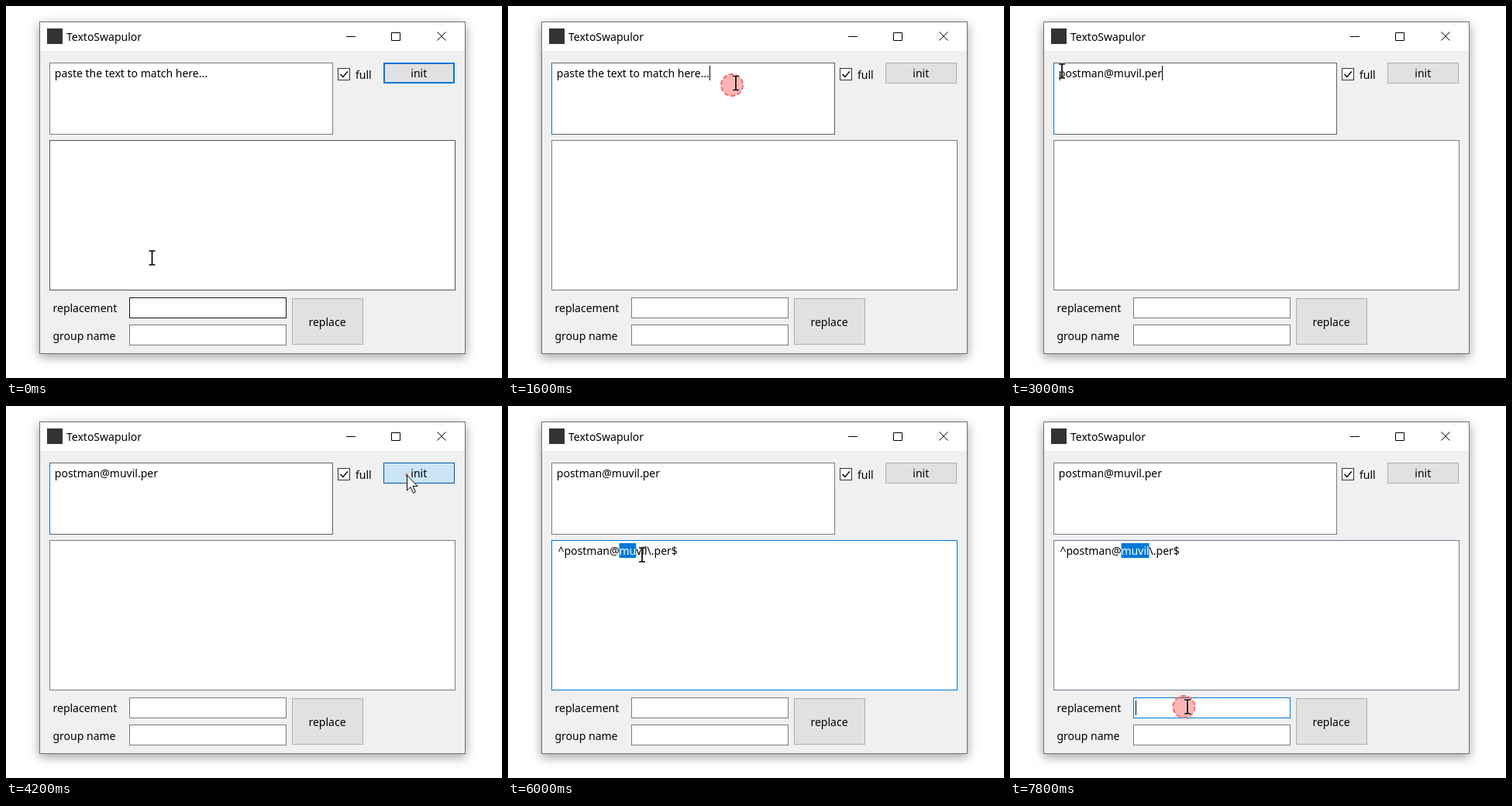
These frames come from a looping animation (640x480 px, 8000 ms). An HTML page:

```html
<!DOCTYPE html>
<html lang="en">
<head>
<meta charset="utf-8">
<title>Text replacement tool</title>
<style>
  html, body { margin: 0; width: 100%; height: 100%; overflow: hidden; background: #fff; }
  svg { display: block; width: 640px; height: 480px; }
  text { font: 14px "Noto Sans", "Open Sans", sans-serif; white-space: pre; }
  .frame { fill: #f0f0f0; stroke: #707070; filter: drop-shadow(0 4px 7px rgba(0, 0, 0, .38)); }
  .field { fill: #fff; stroke: #7a7a7a; }
  .button { fill: #e1e1e1; stroke: #adadad; }
  .line { fill: none; stroke: #000; }
  .mid { text-anchor: middle; }
  .sel { fill: #0078d7; }
  .inv { fill: #fff; }
</style>
</head>
<body>
<svg viewBox="0 0 640 480">
  <defs>
    <clipPath id="clipA"><rect id="cutA" y="77" height="19"/></clipPath>
    <clipPath id="clipB"><rect id="cutB" y="177" height="19"/></clipPath>
  </defs>
  <rect width="640" height="480" fill="#fff"/>
  <rect class="frame" x="43.5" y="20.5" width="549" height="428"/>
  <rect x="44" y="21" width="548" height="37" fill="#fff"/>
  <rect x="53" y="29" width="20" height="20" fill="#333"/>
  <text x="78" y="45">TextoSwapulor</text>
  <path class="line" d="M439 39.5h12M497.5 34.5h11v10h-11zM556.5 33.5l11 11m0-11l-11 11"/>

  <rect id="input" class="field" x="56.5" y="73.5" width="365" height="92"/>
  <path id="inputEdge" d="M56.5 73v93" stroke="#0078d7"/>
  <text id="textA" x="62.8" y="92"></text>
  <rect id="selA" class="sel" y="77" height="19"/>
  <text id="invA" class="inv" x="62.8" y="92" clip-path="url(#clipA)"></text>

  <rect x="428.5" y="80.5" width="15" height="15" fill="#fff" stroke="#333"/>
  <path class="line" d="M431.5 88l3.3 3.5 6-7" stroke-width="1.4"/>
  <text x="451" y="94">full</text>
  <rect id="init" class="button"/>
  <text class="mid" x="532.8" y="92">init</text>

  <rect id="pattern" class="field" x="56.5" y="173.5" width="523" height="193"/>
  <text id="textB" x="64.5" y="192"></text>
  <rect id="selB" class="sel" y="177" height="19"/>
  <text id="invB" class="inv" x="64.5" y="192" clip-path="url(#clipB)"></text>

  <text x="60.5" y="395">replacement</text>
  <text x="60.5" y="431">group name</text>
  <rect id="repl" class="field" x="159.5" y="376.5" width="202" height="26"/>
  <rect class="field" x="159.5" y="411.5" width="202" height="26"/>
  <rect class="button" x="369.5" y="377.5" width="91" height="59"/>
  <text class="mid" x="414.5" y="413">replace</text>

  <rect id="caret" width="1"/>
  <circle id="ring" fill="#f00" fill-opacity=".29" stroke="#f26b6b" stroke-width="2" stroke-dasharray="6 2.8"/>
  <g id="beam">
    <path d="M-4 -9h3l1 1 1-1h3M-4 9h3l1-1 1 1h3M0 -8v16" fill="none" stroke="#fff" stroke-width="3" opacity=".6"/>
    <path d="M-4 -9h3l1 1 1-1h3M-4 9h3l1-1 1 1h3M0 -8v16" fill="none" stroke="#000" stroke-width="1.7"/>
  </g>
  <path id="arrow" d="M.5 .5v19.5l4.5-4.4 3.4 7.6 3-1.4-3.4-7.4h6z" fill="#fff" stroke="#000"/>
</svg>
<script>
const LOOP = 8000, STEP = 200;
const PROMPT = 'paste the text to match here...';
const MAIL = 'postman@muvil.per';
const PATTERN = '^postman@muvil\\.per$';
const GREY = '#7a7a7a', DARK = '#171717', BLUE = '#0078d7';

// time, x, y of the pointer
const PATH = [
  [0, 188.5, 325], [1200, 293, 102], [1600, 294, 99.5], [2200, 72, 73.5],
  [2400, 67, 79.5], [2600, 67, 84], [3000, 67, 84], [3600, 398, 147],
  [3800, 490, 66], [4000, 516, 86], [4200, 517, 89], [4400, 517, 90],
  [4800, 225, 222], [5000, 194, 200], [5400, 148, 190], [5600, 145, 191],
  [6000, 173, 192], [6400, 184, 192], [6800, 184, 192], [7600, 228, 389], [7800, 229, 388]
];
// time, x, y of each press
const CLICKS = [[1400, 289, 102], [4200, 517, 89], [5600, 140, 191], [7600, 224.5, 388]];

const ui = {};
document.querySelectorAll('svg [id]').forEach(el => ui[el.id] = el);

const set = (el, attrs) => { for (const k in attrs) el.setAttribute(k, attrs[k]); };
const show = (el, on) => { el.style.display = on ? '' : 'none'; };
const paint = (el, color) => { el.style.stroke = color; };
const inside = (x, y, l, t, r, b) => x >= l && x <= r && y >= t && y <= b;

function pointer(t) {
  const i = PATH.findIndex(k => k[0] > t);
  if (i < 0) return PATH[PATH.length - 1].slice(1);
  const a = PATH[i - 1], b = PATH[i];
  const p = (t - a[0]) / (b[0] - a[0]), e = p * p * (3 - 2 * p);
  return [a[1] + (b[1] - a[1]) * e, a[2] + (b[2] - a[2]) * e];
}

function write(id, str) {
  for (const el of [ui['text' + id], ui['inv' + id]])
    if (el.textContent !== str) el.textContent = str;
}

function edge(el, n) {
  return +el.getAttribute('x') + (n ? el.getSubStringLength(0, n) : 0);
}

function select(id, from, to) {
  const el = ui['text' + id];
  const on = to > from;
  const x = on ? edge(el, from) : 0, width = on ? edge(el, to) - x : 0;
  set(ui['sel' + id], { x, width });
  set(ui['cut' + id], { x, width });
}

function charAt(el, x) {
  let n = 0;
  const len = el.textContent.length;
  while (n < len && (edge(el, n) + edge(el, n + 1)) / 2 < x) n++;
  return n;
}

function drawInit(t) {
  const focus = t < 1400 || (t >= 4600 && t < 5600);
  const pressed = t === 4200, hover = t === 4000 || t === 4400;
  const o = focus ? 1 : .5;
  set(ui.init, { x: 487 + o, y: 73 + o, width: 92 - 2 * o, height: 27 - 2 * o, 'stroke-width': 2 * o });
  ui.init.style.fill = pressed ? '#cce4f7' : hover ? '#e5f1fb' : '#e1e1e1';
  paint(ui.init, pressed ? '#005499' : focus || hover ? BLUE : '#adadad');
}

function drawBorders(t) {
  const editing = t >= 1400 && t < 4400;
  show(ui.inputEdge, editing);
  paint(ui.input, editing ? '#5e6267' : t >= 1000 && t < 1400 ? DARK : t >= 4400 && t < 5200 ? '#444' : GREY);
  paint(ui.pattern,
    t < 200 ? '#555' : t < 800 ? DARK : t < 4800 ? GREY :
    t < 5600 ? DARK : t < 7600 ? BLUE : '#6b7a90');
  paint(ui.repl, t < 200 || t === 7400 ? DARK : t >= 7600 ? BLUE : GREY);
}

function drawCaret(t) {
  const typed = t >= 2800;
  const blink = Math.floor((t - 2800) / 530) % 2 === 0;
  const inInput = (t >= 1400 && t < 1800) || (typed && t < 4200 && blink);
  const inRepl = t >= 7600;
  show(ui.caret, inInput || inRepl);
  if (inRepl) set(ui.caret, { x: 162, y: 380, height: 19 });
  else if (inInput) {
    const x = Math.round(edge(ui.textA, ui.textA.textContent.length));
    set(ui.caret, { x, y: 77, height: 19 });
  }
}

function drawPointer(t, x, y) {
  const text = inside(x, y, 56, 73, 422, 166) || inside(x, y, 56, 173, 580, 367) ||
    inside(x, y, 159, 376, 362, 403);
  show(ui.beam, text);
  show(ui.arrow, !text);
  set(text ? ui.beam : ui.arrow, { transform: `translate(${x.toFixed(1)} ${y.toFixed(1)})` });

  const click = CLICKS.find(c => t >= c[0] && t < c[0] + 400);
  show(ui.ring, click);
  if (click) set(ui.ring, { cx: click[1], cy: click[2], r: t === click[0] ? 1 : 14 });
}

function render(time) {
  const t = Math.floor(time / STEP) * STEP;
  const [x, y] = pointer(t);
  write('A', t < 2800 ? PROMPT : MAIL);
  write('B', t < 4400 ? '' : PATTERN);

  const dragging = t >= 1800 && t < 2800;
  select('A', dragging ? charAt(ui.textA, x - 2) : 0, dragging ? PROMPT.length : 0);
  const count = t < 5600 ? 0 : [0, 1, 2, 4, 5][Math.min(4, (t - 5600) / STEP)];
  select('B', 9, 9 + count);

  drawInit(t);
  drawBorders(t);
  drawCaret(t);
  drawPointer(t, x, y);
}

const start = performance.now();
function tick() {
  render((performance.now() - start) % LOOP);
  requestAnimationFrame(tick);
}
tick();
</script>
</body>
</html>
```
